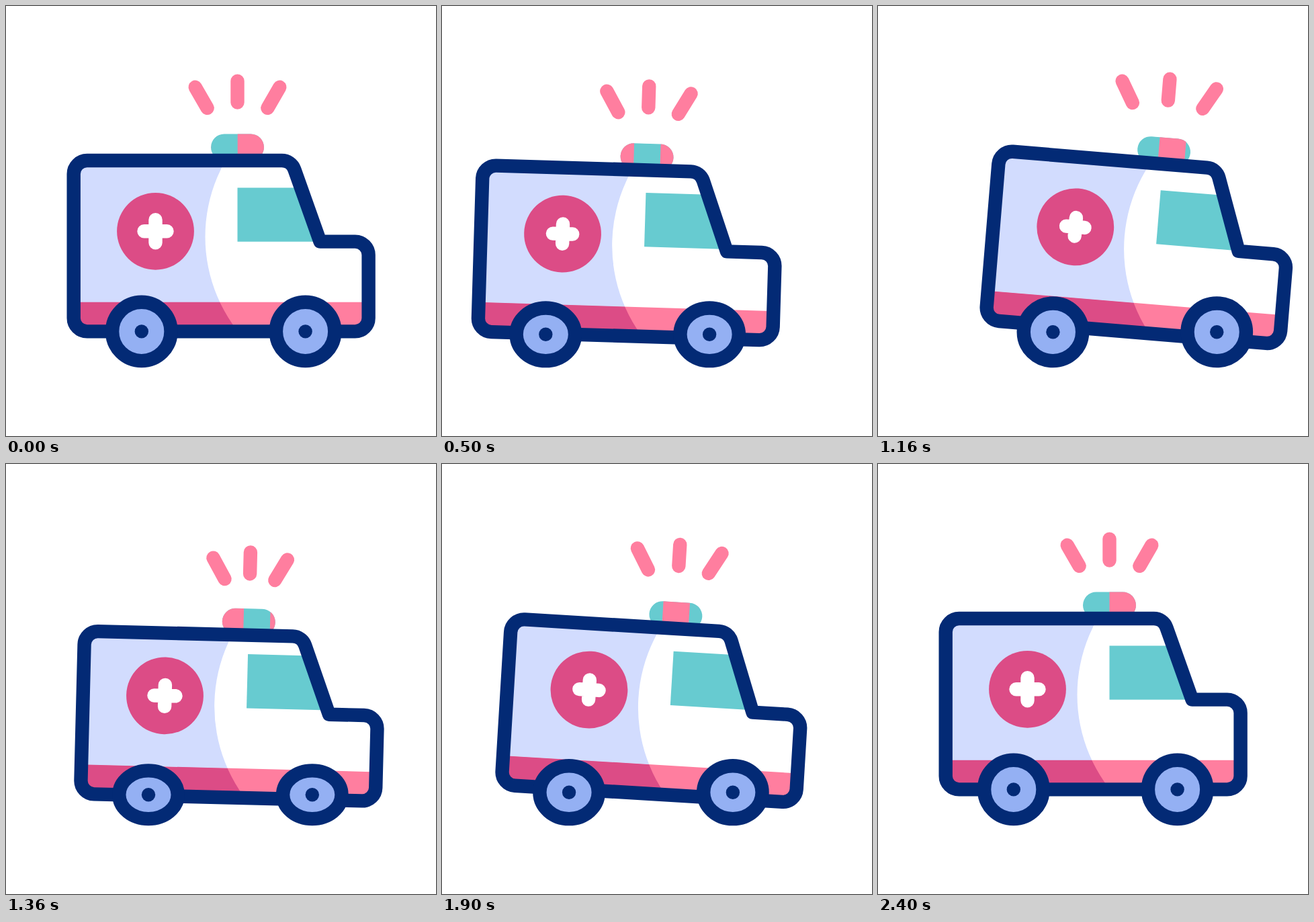
These frames come from a looping animation (640 px wide and 640 px high, 2420 ms). An HTML page:

```html
<!DOCTYPE html>
<html lang="en">
<head>
<meta charset="utf-8">
<title>Ambulance</title>
<style>
  html, body { margin: 0; width: 100%; height: 100%; overflow: hidden; background: #fff; }
  svg { display: block; width: 100vw; height: 100vh; }
  .line { stroke: #032a75; stroke-width: 20.4; stroke-linejoin: round; }
  .ray { fill: none; stroke: #ff7e9f; stroke-width: 20.4; stroke-linecap: round; }
  .cross { stroke: #fff; stroke-width: 20.4; stroke-linecap: round; }
  .navy { fill: #032a75; }
  .teal { fill: #67cbd0; }
  .pink { fill: #ff7e9f; }
  .rose { fill: #dc4c86; }
  .sky { fill: #d2dcfe; }
  .tire { fill: #94b0f3; }
</style>
</head>
<body>
<svg viewBox="0 0 640 640">
  <defs>
    <clipPath id="cabin"><path class="hull"/></clipPath>
    <clipPath id="left"><path d="M60 180H365.6A228 228 0 0 0 365.6 507H60Z"/></clipPath>
    <clipPath id="lamp"><rect x="305" y="190.5" width="79" height="39.4" rx="19.7"/></clipPath>
  </defs>
  <g id="car">
    <path class="ray" d="M281.7 120.8L299.6 151.8"/>
    <path class="ray" d="M344.5 111.6V143.6"/>
    <path class="ray" d="M407.3 120.8L389.4 151.8"/>
    <g id="siren" clip-path="url(#lamp)">
      <rect class="teal" x="304" y="190" width="81" height="41"/>
      <path id="bands" class="pink" d="M344.5 190h39.5v41h-39.5zM265.5 190h39.5v41h-39.5z"/>
    </g>
    <g clip-path="url(#cabin)">
      <rect x="90" y="220" width="460" height="275" fill="#fff"/>
      <rect class="pink" x="90" y="440.8" width="460" height="54"/>
      <g clip-path="url(#left)">
        <rect class="sky" x="90" y="220" width="300" height="221"/>
        <rect class="rose" x="90" y="440.8" width="300" height="54"/>
      </g>
      <path class="teal" d="M344.5 270.4H437L466 350.8H344.5Z"/>
    </g>
    <circle class="rose" cx="222.5" cy="335.3" r="57.4"/>
    <path id="cross" class="cross"/>
    <path class="hull line" fill="none"/>
  </g>
  <g id="wheels">
    <g><ellipse class="tire line" cx="201.8" rx="43.7"/><circle class="navy" cx="201.8" r="10.2"/></g>
    <g><ellipse class="tire line" cx="445.6" rx="43.7"/><circle class="navy" cx="445.6" r="10.2"/></g>
  </g>
</svg>
<script>
  const LOOP = 2420, END = 2400, AXLE = 484.4;
  const $ = id => document.getElementById(id);
  const all = sel => [...document.querySelectorAll(sel)];
  const hulls = all('.hull'), rays = all('.ray');
  const tires = all('.tire'), hubs = all('#wheels circle');

  const DRIVE = [[0, 0], [600, -51.2], [1000, 76.8], [1600, -25.6], [2200, 0], [END, 0]];
  const TILT = [0, 3, -5, 5, -5, 5, 0].map((v, i) => [i * 400, v]);
  const PULSE = [1, .8, 1.2, .8, 1.2, .8, 1].map((v, i) => [i * 400, v]);

  const ease = x => x * x * (3 - 2 * x);

  function at(keys, t) {
    const i = Math.max(1, keys.findIndex(k => k[0] >= t));
    const [t0, a] = keys[i - 1], [t1, b] = keys[i];
    return a + (b - a) * ease((t - t0) / (t1 - t0));
  }

  // Body outline; the roof sinks by `drop`, the hood in proportion.
  function outline(drop) {
    const roof = 230 + drop, hood = 350.6 + drop * .53;
    return `M100.7 ${roof + 20}A20 20 0 0 1 120.7 ${roof}H410.5` +
      `A20 20 0 0 1 429.3 ${roof + 13.2}L467.5 ${hood}H519.6` +
      `A20 20 0 0 1 539.6 ${hood + 20}V464.4A20 20 0 0 1 519.6 484.4` +
      `H120.7A20 20 0 0 1 100.7 464.4Z`;
  }

  function draw(t) {
    const dx = at(DRIVE, t);
    const squash = ease(1 - Math.abs(t % 400 - 200) / 200);
    const drop = 13.4 * squash;

    $('car').setAttribute('transform',
      `translate(${dx} ${drop}) rotate(${at(TILT, t)} 323.7 ${AXLE})`);
    for (const h of hulls) h.setAttribute('d', outline(drop));

    $('siren').setAttribute('transform', `translate(0 ${drop})`);
    $('bands').setAttribute('transform', `translate(${t % 400 / 400 * 79} 0)`);

    // Rays start and finish at rest, swinging both ways in between.
    const atEdge = t < 200 || t > END - 200;
    const swing = 8.96 * (atEdge ? squash : 2 * squash - 1);
    rays.forEach((ray, i) => {
      const side = 1 - i, k = side ? 1.05 : 1;
      ray.setAttribute('transform', `translate(${side * k * swing} ${k * swing})`);
    });

    const arm = 17 * at(PULSE, t);
    $('cross').setAttribute('d',
      `M${222.5 - arm} 335.3h${2 * arm}M222.5 ${335.3 - arm}v${2 * arm}`);

    const sink = 8.7 * squash;
    $('wheels').setAttribute('transform', `translate(${dx} ${AXLE + sink})`);
    for (const w of tires) w.setAttribute('ry', 43.7 - sink);
  }

  function tick() {
    draw(Math.min(performance.now() % LOOP, END));
    requestAnimationFrame(tick);
  }
  tick();
</script>
</body>
</html>
```
